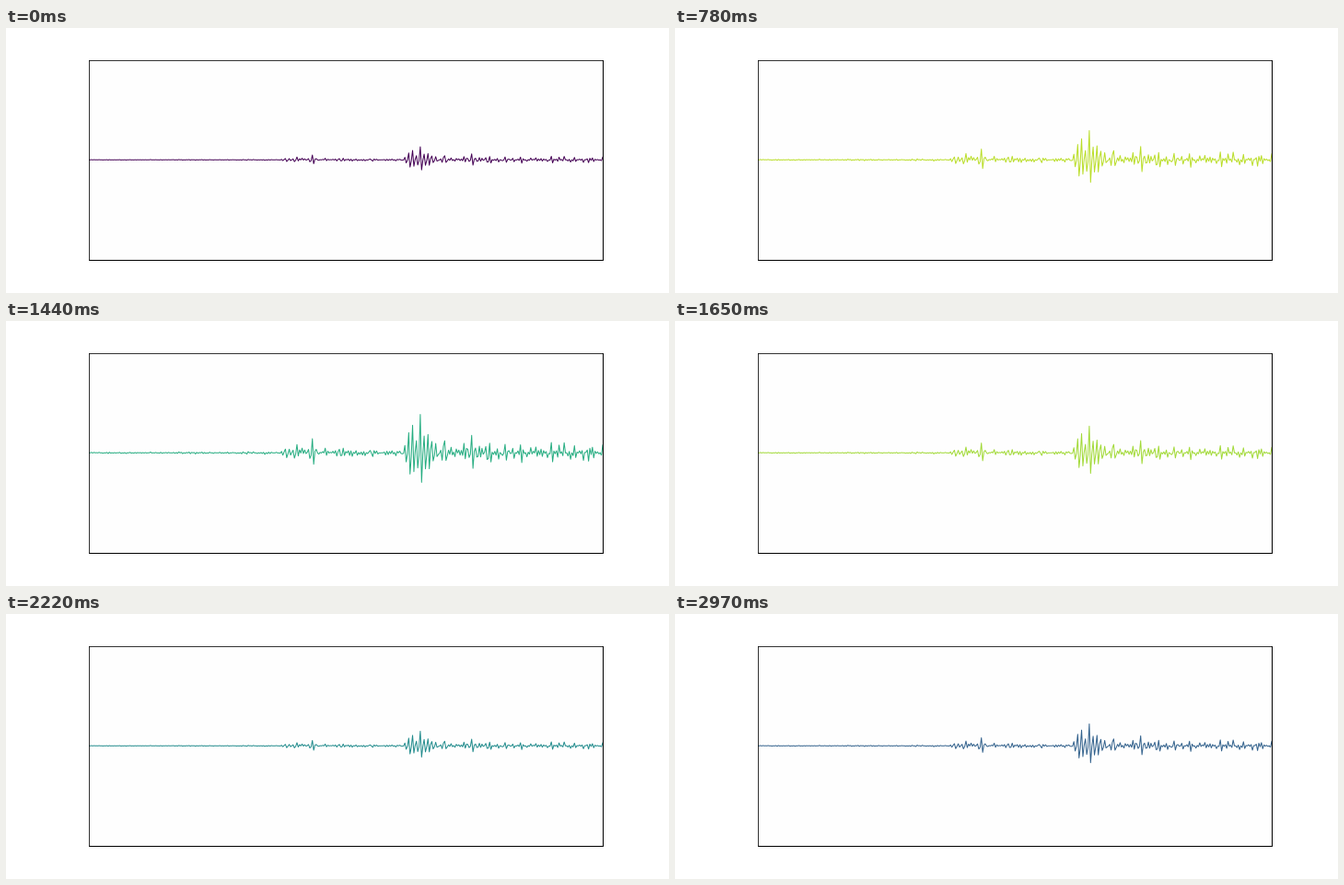
Recreate the animation shown at these times as a matplotlib script. Size 720x288 px, loop 3 s.

```python
import numpy as np
import matplotlib.pyplot as plt
from matplotlib.animation import FuncAnimation

FRAMES, INTERVAL = 100, 30
SAMPLES = 401
ZOOM_STEPS = 40      # frames per zoom direction
COLOR_STEPS = 30     # frames per colour sweep

# Wave packets: centre, height, width in samples
PACKETS = [
    (154, 9, 3), (161, 14, 2), (174, 21, 3), (196, 8, 4), (220, 6, 2),
    (251, 42, 4), (258, 49, 2), (263, 30, 4), (269, 12, 3), (277, 23, 2),
    (299, 17, 4), (310, 12, 4), (324, 10, 5), (337, 16, 2), (360, 15, 2),
    (387, 8, 3),
]


def make_trace():
    rng = np.random.default_rng(4)
    k = np.arange(SAMPLES)
    envelope = sum(h * np.exp(-((k - c) / w) ** 2) for c, h, w in PACKETS)
    # The carrier lags by one sample for a while after the main shock
    lag = np.interp(k, [270, 277, 303, 309], [0, 1, 1, 0])
    carrier = np.cos(2 * np.pi * (k - lag) / 3 + 0.45)
    level = np.interp(k, [0, 151, 152, 268, 285, 400],
                      [0.4, 0.9, 2.3, 2.3, 5, 4.5])
    jitter = (-1.0) ** k * np.abs(rng.normal(size=SAMPLES))
    return k, envelope * carrier + level * jitter


def zoom_limit(i):
    """Half height of the view: shrinks, holds one frame, then grows."""
    p = i % (2 * ZOOM_STEPS)
    n = ZOOM_STEPS - 1 - p if p < ZOOM_STEPS else p - ZOOM_STEPS
    return 9.06 * (8 + n)


fig = plt.figure(figsize=(10, 4), dpi=72, facecolor="white")
ax = fig.add_axes([0.125, 0.125, 0.775, 0.755], facecolor="#fefefe")
ax.spines[["right", "bottom"]].set_linewidth(1)
ax.set_xlim(0, SAMPLES - 1)
ax.set_xticks([])
ax.set_yticks([])
line, = ax.plot(*make_trace(), lw=1)


def update(i):
    limit = zoom_limit(i)
    ax.set_ylim(-limit, limit)
    line.set_color(plt.cm.viridis(i % COLOR_STEPS / (COLOR_STEPS - 1)))
    return line,


anim = FuncAnimation(fig, update, frames=FRAMES, interval=INTERVAL,
                     repeat=True, repeat_delay=0)
plt.show()
```
